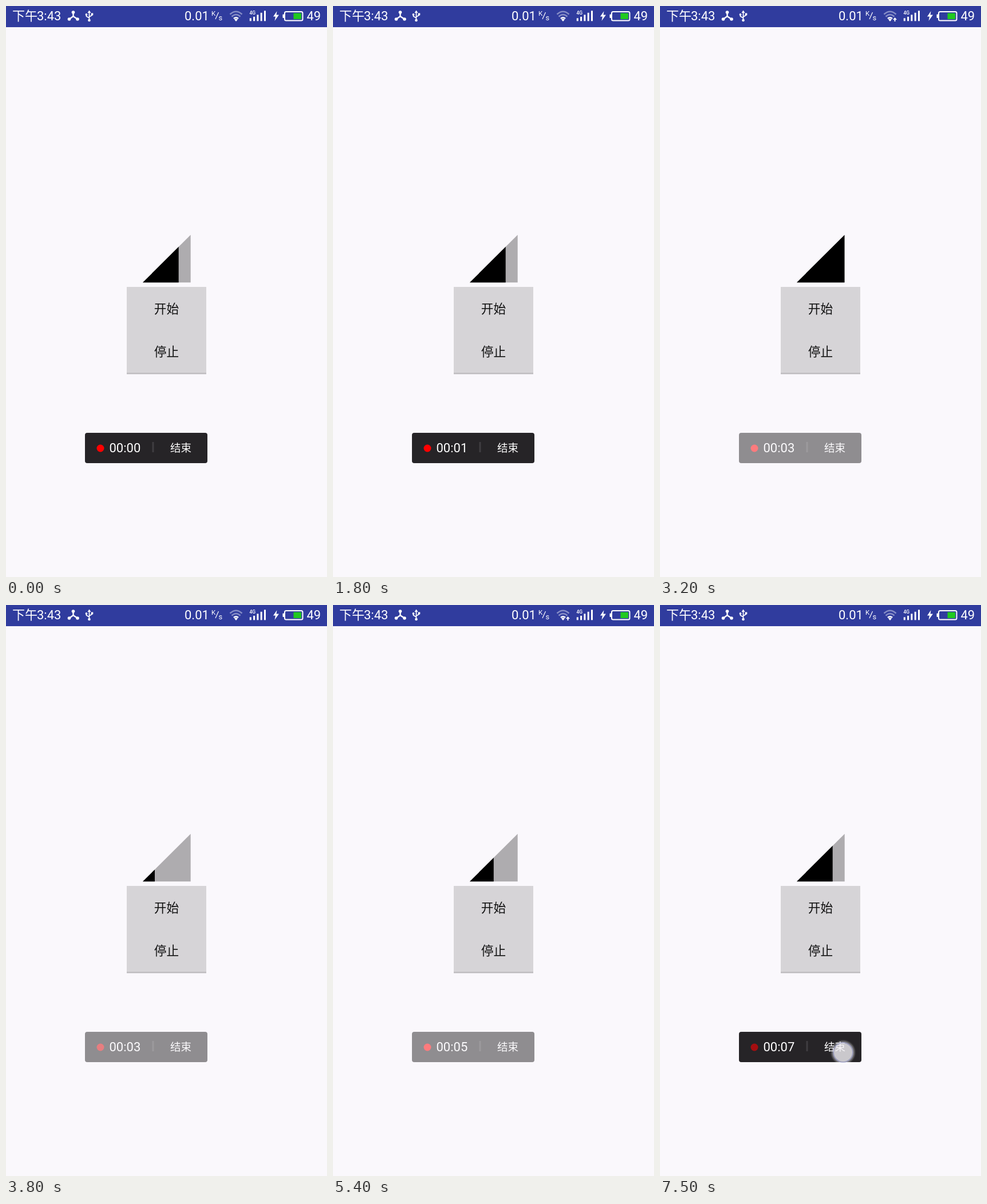
Write an HTML page that moves like this. It is 561 px wide and 998 px high and loops after 7.6 s.

```html
<!DOCTYPE html>
<html lang="zh">
<head>
<meta charset="utf-8">
<style>
  html, body { margin: 0; width: 100%; height: 100%; overflow: hidden; background: #faf8fc; }
  svg { display: block; width: 561px; height: 998px; }
  text { font-family: Roboto, "Noto Sans CJK SC", "Noto Sans CJK", sans-serif; font-size: 22px; fill: #fff; white-space: pre; }
  .label { font-size: 21.7px; font-weight: 500; fill: #111; }
  .line { fill: none; stroke: #fff; stroke-width: 2; }
</style>
</head>
<body>
<svg viewBox="0 0 561 998">
  <defs>
    <clipPath id="levelClip"><rect id="fill" x="239" y="395" height="95"/></clipPath>
    <filter id="soft" x="-50%" y="-50%" width="200%" height="200%"><feGaussianBlur stdDeviation="1.6"/></filter>
    <filter id="edge"><feGaussianBlur stdDeviation=".5"/></filter>
  </defs>
  <rect width="561" height="998" fill="#faf8fc"/>

  <!-- status bar -->
  <rect width="561" height="37" fill="#303c9e"/>
  <text x="11" y="25">下午</text><text x="54" y="25">3:43</text>
  <g class="line">
    <path d="M117.500 11V18L110.500 23M117.500 18L125 23" stroke-width="2.400"/>
    <path d="M145.500 11V24M145.500 21L140.500 18V15M145.500 19L150.500 16V14" stroke-width="1.700"/>
  </g>
  <g fill="#fff">
    <circle cx="117.500" cy="11" r="2.800"/><circle cx="110.500" cy="23" r="2.800"/><circle cx="125" cy="23" r="2.800"/>
    <path d="M145.500 7.500L148.500 12H142.500Z"/>
    <circle cx="145.500" cy="25" r="2.300"/><circle cx="140.500" cy="15" r="1.900"/><rect x="148.700" y="12.500" width="3.600" height="3.600"/>
  </g>
  <text x="312" y="25">0.01</text>
  <text x="359" y="17" style="font-size:11.5px">K</text>
  <path class="line" d="M366 23L371.500 11" style="stroke-width:1.2"/>
  <text x="371.500" y="25" style="font-size:13px">s</text>
  <g class="line" style="stroke-width:2.6">
    <path d="M391.500 14.500Q402 5 412.500 14.500M394.500 18.500Q402 11.500 409.500 18.500" opacity=".42"/>
    <path d="M398 22Q402 18.500 406 22"/>
  </g>
  <path d="M399 23.500Q402 21 405 23.500L402 27Z" fill="#fff"/>
  <path id="upload" d="M410.500 20L414 24H411.500V27H409.500V24H407Z" fill="#fff"/>
  <text x="425.500" y="15" style="font-size:8.5px;font-weight:500">4G</text>
  <g id="bars" fill="#fff"></g>
  <path d="M473.500 9L467 18.500H471L469.500 26L477 15.500H472.500Z" fill="#fff"/>
  <rect x="487" y="10" width="31.500" height="15.500" rx="2.500" class="line"/>
  <rect x="483.500" y="14.500" width="3" height="6.500" rx="1" fill="#fff"/>
  <rect x="502.500" y="12.500" width="13.500" height="10.500" fill="#20c91f"/>
  <text x="525.500" y="25">49</text>

  <!-- level triangle -->
  <path d="M239 483.300L322.700 400V483.300Z" fill="#aeacaf" filter="url(#edge)"/>
  <path d="M239 483.300L322.700 400V483.300Z" clip-path="url(#levelClip)"/>

  <!-- buttons -->
  <rect x="211" y="493" width="139" height="150.500" fill="#aaa8ab" opacity=".75" filter="url(#edge)"/>
  <rect x="211" y="491" width="139" height="150" fill="#d6d4d7"/>
  <rect id="pressed" x="211" width="139" height="75" fill="#d1cfd2"/>
  <text class="label" x="258.800" y="537">开始</text>
  <text class="label" x="258.800" y="611.500">停止</text>

  <!-- recorder panel -->
  <g id="panel">
    <rect x="138" y="746" width="214" height="53" rx="4" fill="#262427"/>
    <circle id="dot" cx="165" cy="773" r="6.500" fill="#f00"/>
    <text id="clock" x="180.500" y="780"></text>
    <rect x="255.500" y="762" width="3" height="18" fill="#3f3d41"/>
    <text x="287" y="778.500" style="font-size:18.500px">结束</text>
  </g>

  <g id="touch">
    <circle r="18.500" fill="none" stroke="#fff" stroke-width="3" opacity=".6" filter="url(#soft)"/>
    <circle r="17" fill="#f4f2f6" stroke="#b6b8dc" stroke-width="2"/>
  </g>
</svg>
<script>
const $ = id => document.getElementById(id);
const LOOP = 7600, FRAME = 100, STEP = 250;

// x, y, down, up, top edge of the button hit (0 = none)
const taps = [
  [302, 531, 700, 850, 491],
  [305, 606, 3800, 3950, 566],
  [322, 537, 4650, 4750, 491],
  [305, 606, 6800, 6950, 566],
  [320, 782, 7460, 7700, 0]
];
const runs = [[850, 3950], [4750, 6950]];
const pulse = [[0, 1], [700, 1], [1050, 0.52], [1300, 1]];

const clamp = v => Math.max(0, Math.min(1, v));

$('bars').innerHTML = [5, 7.5, 11, 14.5, 18].map((h, i) =>
  `<rect x="${425.8 + i * 6.3}" y="${26.3 - h}" width="3" height="${h}"/>`).join('');

function level(t) {
  let value = 3;
  for (const [start, stop] of runs)
    if (t >= start) value = Math.floor((Math.min(t, stop - 1) - start) / STEP) % 5;
  return value;
}

function ramp(keys, t) {
  const i = keys.findIndex(k => k[0] > t);
  const [t0, v0] = keys[i - 1], [t1, v1] = keys[i];
  return v0 + (v1 - v0) * (t - t0) / (t1 - t0);
}

function drawTap(t) {
  const tap = taps.find(([, , down, up]) => t >= down && t < up + 200);
  $('touch').setAttribute('opacity', 0);
  $('pressed').setAttribute('opacity', 0);
  if (!tap) return;
  const [x, y, down, up, top] = tap;
  $('touch').setAttribute('transform', `translate(${x} ${y})`);
  $('touch').setAttribute('opacity', Math.min(clamp((t - down) / 50), clamp(1 - (t - up) / 200)));
  if (top && t >= down + 100) {
    $('pressed').setAttribute('y', top);
    $('pressed').setAttribute('opacity', 1);
  }
}

function draw(t) {
  $('fill').setAttribute('width', level(t) * 20.9);
  $('clock').textContent = '00:0' + Math.floor(t / 1000);
  $('dot').setAttribute('opacity', ramp(pulse, t % 1300));
  $('panel').setAttribute('opacity', t >= 3000 && t < 7450 ? 0.5 : 1);
  const uploading = (t >= 2500 && t < 3500) || (t >= 4500 && t < 5500);
  $('upload').setAttribute('opacity', uploading ? 1 : 0);
  drawTap(t);
}

const origin = performance.now();
function tick() {
  const t = (performance.now() - origin) % LOOP;
  draw(Math.floor(t / FRAME) * FRAME);
  requestAnimationFrame(tick);
}
tick();
</script>
</body>
</html>
```
